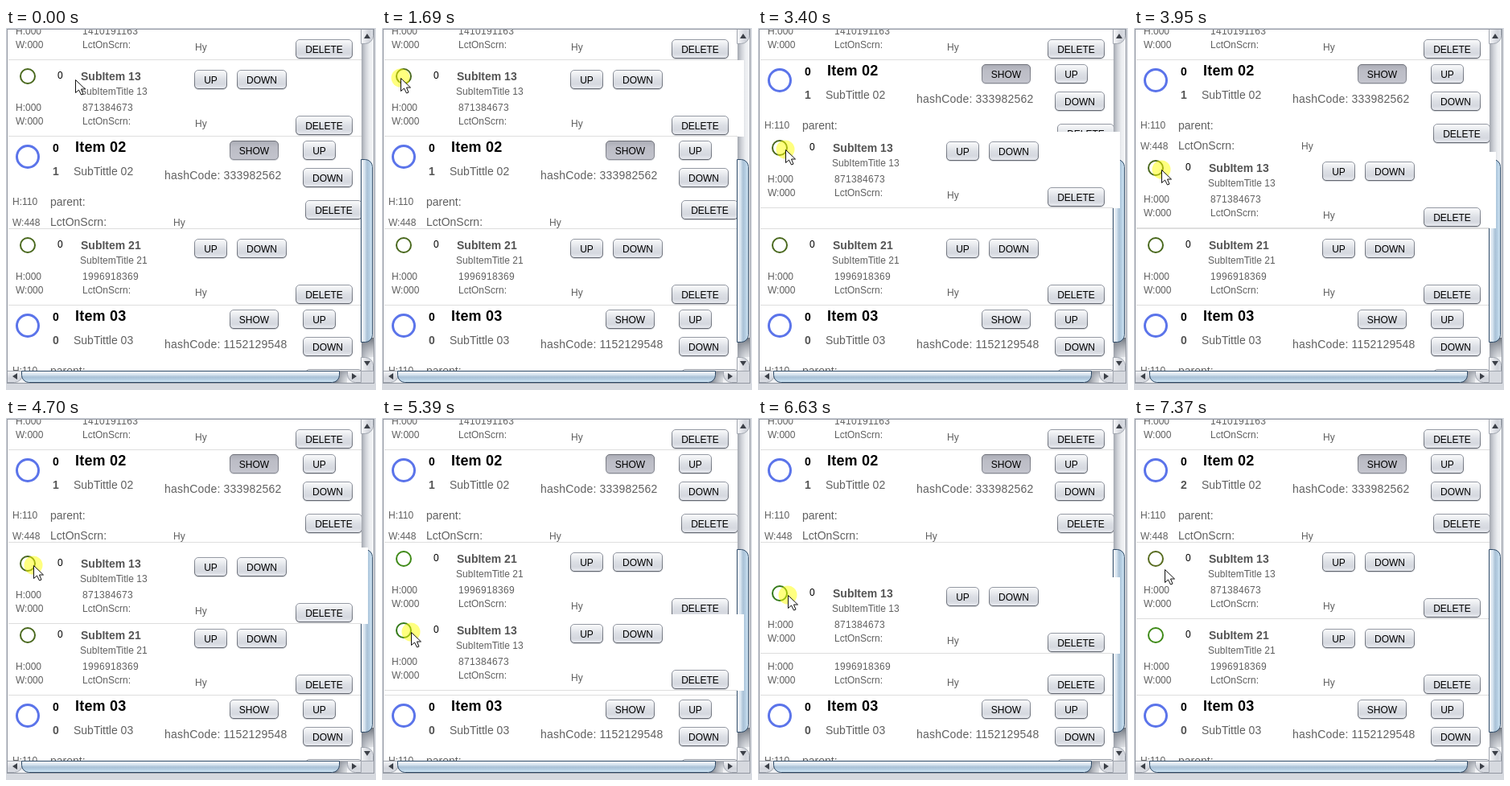
These frames come from a looping animation (460 by 450 pixels, 8 s). An HTML page with a canvas:

```html
<!DOCTYPE html>
<html lang="en">
<head>
<meta charset="utf-8">
<title>Drag and drop list</title>
<style>
html, body { margin: 0; width: 100%; height: 100%; overflow: hidden; background: #d6d9df; }
canvas { display: block; }
</style>
</head>
<body>
<canvas id="stage" width="460" height="450"></canvas>
<script>
const ctx = document.getElementById('stage').getContext('2d');
const LOOP = 8000, PRESS = 1550, LIFT = 1690, DROP = 7370;
const GRAB = 22, STEP = 70;
const GRAY = '#606060', BLACK = '#000';

// Pointer tip: time, x, y
const path = [
  [0, 86, 64], [660, 86, 64], [1290, 20, 62], [1480, 20, 62], [1970, 27, 62],
  [2360, 27, 62], [2700, 29, 104], [3190, 33, 142], [3400, 34, 151], [3750, 34, 174],
  [3850, 34, 174], [4150, 34, 182], [4630, 34, 182], [4700, 34, 183], [5040, 35, 220],
  [5390, 36, 266], [5460, 36, 275], [5530, 36, 280], [5790, 36, 280], [6140, 36, 249],
  [6630, 37, 220], [6840, 38, 188], [LOOP, 38, 188]
];

function pointerAt(t) {
  const i = path.findIndex(p => p[0] > t);
  const [t0, x0, y0] = path[i - 1], [t1, x1, y1] = path[i];
  const steps = Math.max(1, Math.round((t1 - t0) / STEP));
  const u = Math.floor((t - t0) / (t1 - t0) * steps + 0.1) / steps;
  return { x: Math.round(x0 + (x1 - x0) * u), y: Math.round(y0 + (y1 - y0) * u) };
}

function text(str, x, y, size = 12, color = GRAY, weight = 'normal', spacing = 0) {
  ctx.font = `${weight} ${size}px "Liberation Sans", Arial, sans-serif`;
  ctx.letterSpacing = spacing + 'px';
  ctx.fillStyle = color;
  ctx.fillText(str, x, y);
}

function gradient(x0, y0, x1, y1, colors) {
  const g = ctx.createLinearGradient(x0, y0, x1, y1);
  colors.forEach((c, i) => g.addColorStop(i / (colors.length - 1), c));
  return g;
}

function rounded(x, y, w, h, radii, fill, stroke) {
  ctx.beginPath();
  ctx.roundRect(x, y, w, h, radii);
  ctx.fillStyle = fill;
  ctx.fill();
  if (stroke) {
    ctx.strokeStyle = stroke;
    ctx.lineWidth = 1;
    ctx.stroke();
  }
}

function button(label, x, y, w, pressed) {
  const h = 24;
  rounded(x, y + 1, w, h, 5, 'rgba(150,155,165,.4)');
  const fill = pressed
    ? gradient(0, y, 0, y + h, ['#a9abb4', '#bcbdc6', '#bfc0c9', '#c4c5ce'])
    : gradient(0, y, 0, y + h, ['#fcfcfd', '#eceef1', '#dcdfe5', '#d5d8df', '#eceef3']);
  const edge = gradient(0, y, 0, y + h, pressed ? ['#6d6f78', '#8b8d96'] : ['#959aa4', '#62666f']);
  rounded(x + .5, y + .5, w - 1, h - 1, 4.5, fill, edge);
  ctx.textAlign = 'center';
  text(label, x + w / 2, y + 16.5, 12, BLACK);
  ctx.textAlign = 'left';
}

function ring(x, y, r, width, color) {
  ctx.beginPath();
  ctx.arc(x, y, r, 0, 7);
  ctx.strokeStyle = color;
  ctx.lineWidth = width;
  ctx.stroke();
}

function rowBase(y, h, width = 439) {
  ctx.fillStyle = '#fff';
  ctx.fillRect(3, y, width, h);
  ctx.fillStyle = '#dedede';
  ctx.fillRect(3, y + h - 1, 439, 1);
}

function subRow(y, number, code, color = '#4a691e', width) {
  rowBase(y, 95, width);
  ring(27, y + 20, 9, 2, color);
  text('0', 64, y + 23, 12, BLACK);
  text('SubItem ' + number, 93, y + 25, 14, '#555', 'bold');
  text('SubItemTitle ' + number, 92, y + 43);
  text('H:000', 12, y + 63);
  text('W:000', 12, y + 80);
  text(code, 95, y + 63, 12, GRAY, 'normal', .33);
  text('LctOnScrn:', 95, y + 79.5);
  text('Hy', 235, y + 83);
  button('UP', 234, y + 12, 41);
  button('DOWN', 287, y + 12, 62);
  button('DELETE', 360, y + 69, 71);
}

function itemRow(y, number, count, code, shown) {
  rowBase(y, 115);
  ring(27, y + 25, 13.5, 3, '#5b74ea');
  text('0', 58, y + 19, 14, BLACK, 'bold');
  text(count, 58, y + 48, 14, '#555', 'bold');
  text('Item ' + number, 86, y + 19, 18, BLACK, 'bold', .2);
  text('SubTittle ' + number, 84, y + 48, 14);
  text('hashCode: ' + code, 197, y + 53, 14, GRAY, 'normal', .2);
  text('H:110', 8, y + 85);
  text('W:448', 8, y + 111);
  text('parent:', 55, y + 86, 14);
  text('LctOnScrn:', 55, y + 111, 14);
  text('Hy', 208, y + 111);
  button('SHOW', 278, y + 5, 61, shown);
  button('UP', 369, y + 5, 41);
  button('DOWN', 369, y + 39, 62);
  button('DELETE', 372, y + 79, 71);
}

function triangle(x, y, angle) {
  ctx.save();
  ctx.translate(x, y);
  ctx.rotate(angle);
  ctx.beginPath();
  ctx.moveTo(0, -3);
  ctx.lineTo(4, 3);
  ctx.lineTo(-4, 3);
  ctx.fillStyle = '#3c4048';
  ctx.fill();
  ctx.restore();
}

function scrollbars() {
  const track = ['#a4a8b0', '#cfd2d8', '#eceef1', '#f4f5f7'];
  const cap = ['#f7f8fa', '#e2e4e9', '#d0d3da', '#dfe2e8'];
  const thumb = ['#f4f8fc', '#dbe7f2', '#a9c1d6', '#b9d2e6', '#e2f3fd'];
  const edge = '#2f4b68';

  ctx.fillStyle = gradient(442, 0, 457, 0, track);
  ctx.fillRect(442, 2, 15, 424);
  const across = gradient(442, 0, 457, 0, cap);
  rounded(441.5, 1.5, 15, 18, [0, 0, 10, 0], across, '#a0a5ae');
  rounded(441.5, 409.5, 15, 17, [0, 10, 0, 0], across, '#a0a5ae');
  ctx.fillStyle = gradient(0, 385, 0, 410, ['#70757e', 'rgba(160,165,174,.2)']);
  ctx.fillRect(442, 385, 15, 24);
  rounded(441.5, 163.5, 14, 227, [0, 9, 9, 0], gradient(442, 0, 456, 0, thumb), edge);
  triangle(449, 10, 0);
  triangle(449, 417, Math.PI);

  ctx.fillStyle = gradient(0, 426, 0, 441, track);
  ctx.fillRect(2, 426, 440, 15);
  const down = gradient(0, 426, 0, 441, cap);
  rounded(1.5, 426.5, 19, 14, [0, 0, 10, 0], down, '#a0a5ae');
  rounded(424.5, 426.5, 17, 14, [0, 0, 0, 10], down, '#a0a5ae');
  ctx.fillStyle = gradient(408, 0, 425, 0, ['#70757e', 'rgba(160,165,174,.2)']);
  ctx.fillRect(406, 427, 18, 14);
  rounded(19.5, 426.5, 395, 14, [0, 0, 9, 9], gradient(0, 427, 0, 441, thumb), edge);
  triangle(11, 433, -Math.PI / 2);
  triangle(433, 433, Math.PI / 2);

  ctx.fillStyle = '#d6d9df';
  ctx.fillRect(442, 427, 15, 14);
  ctx.strokeStyle = '#9297a1';
  ctx.lineWidth = 1;
  ctx.strokeRect(1.5, 1.5, 456, 440);
}

function highlight({ x, y }) {
  ctx.beginPath();
  ctx.arc(x, y, 11.5, 0, 7);
  ctx.fillStyle = 'rgba(255,255,0,.5)';
  ctx.fill();
}

function cursor({ x, y }) {
  const outline = [[0, 0], [0, 16], [4, 12.5], [7, 18.5], [9.5, 17.5], [7, 11.5], [12, 11.5]];
  ctx.beginPath();
  outline.forEach(([dx, dy]) => ctx.lineTo(x + dx + .5, y + dy + .5));
  ctx.closePath();
  ctx.fillStyle = '#fff';
  ctx.fill();
  ctx.strokeStyle = '#111';
  ctx.lineWidth = 1;
  ctx.stroke();
}

function draw(t) {
  const tip = pointerAt(t);
  const top = tip.y - GRAB;
  const dragging = t >= LIFT && t < DROP;
  const lifted = t >= LIFT;
  const moved = lifted && top >= 65;
  const swapped = lifted && top >= 202;
  const slot = swapped ? 250 : moved ? 155 : 40;
  const repainted = t > 5000;

  ctx.fillStyle = '#d6d9df';
  ctx.fillRect(0, 0, 460, 450);
  ctx.save();
  ctx.beginPath();
  ctx.rect(2, 2, 440, 424);
  ctx.clip();
  ctx.fillStyle = '#fff';
  ctx.fillRect(2, 2, 440, 424);
  subRow(-55, '12', '1410191163');
  rowBase(slot, 95);
  itemRow(moved ? 40 : 135, '02', t < DROP ? '1' : '2', '333982562', true);
  subRow(swapped ? 155 : 250, '21', '1996918369', repainted ? '#3f8a18' : undefined);
  itemRow(345, '03', '0', '1152129548', false);
  if (!dragging) subRow(slot, '13', '871384673', repainted ? '#586c20' : undefined);
  ctx.restore();

  scrollbars();
  if (dragging) subRow(top, '13', '871384673', repainted ? '#347a18' : undefined, 447);
  if (t >= PRESS && t < DROP) highlight(tip);
  cursor(tip);
}

const start = performance.now();
function tick() {
  draw((performance.now() - start) % LOOP);
  requestAnimationFrame(tick);
}
tick();
</script>
</body>
</html>
```
